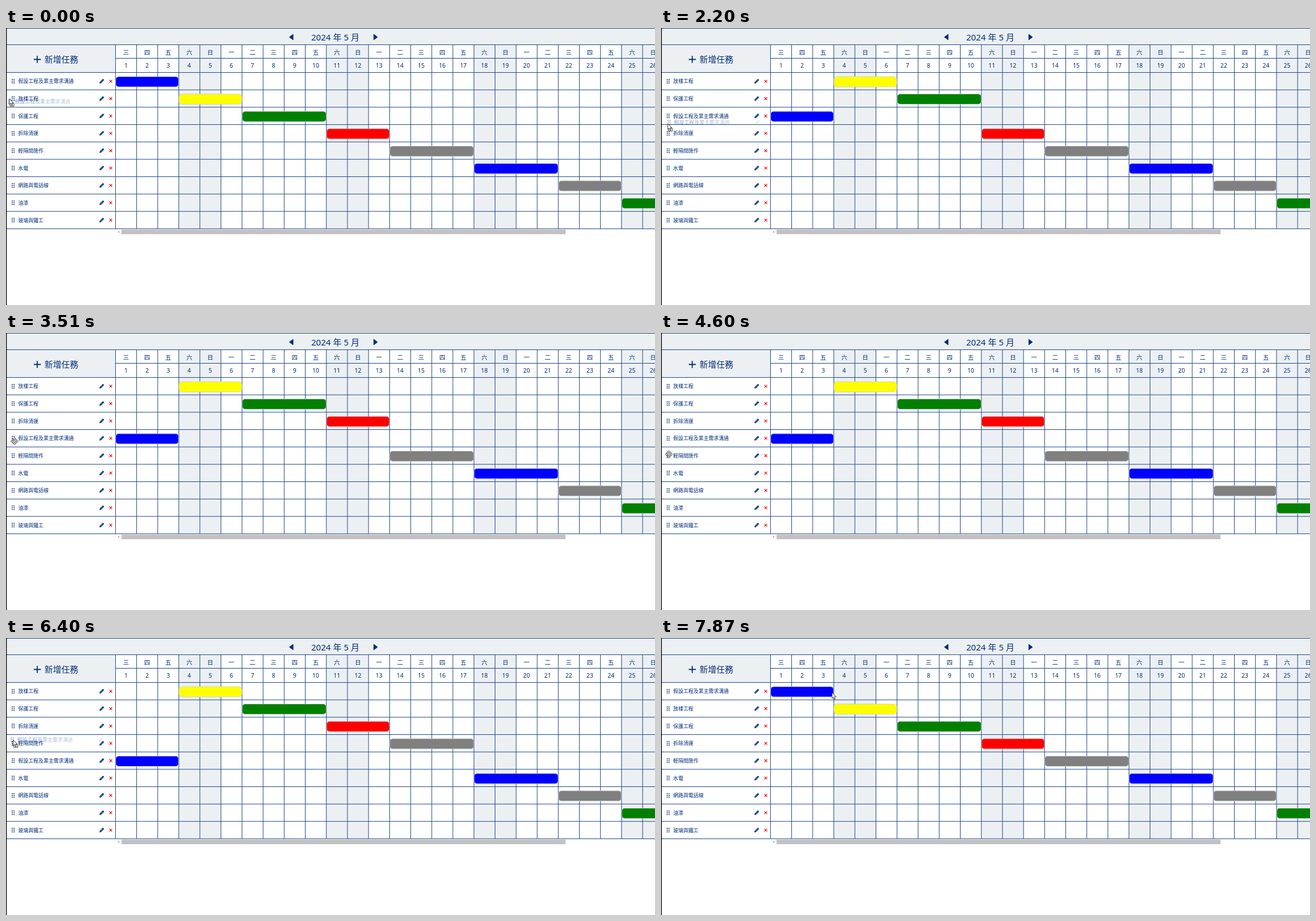
An HTML page with a canvas that plays this animation: 1146 px wide and 489 px high, repeating every 7.99 s.

```html
<!DOCTYPE html>
<html lang="zh-Hant">
<head>
<meta charset="utf-8">
<title>Gantt drag and drop</title>
<style>
html, body { margin: 0; width: 100%; height: 100%; overflow: hidden; background: #fff; }
canvas { display: block; }
</style>
</head>
<body>
<canvas id="stage" width="1146" height="489"></canvas>
<script>
const ctx = document.getElementById('stage').getContext('2d');
const LOOP = 7990, LEFT = 192.9, COL = 37.23, TOP = 78.05, ROW = 30.65;
const INK = '#002c77', LINE = '#1c4587', SHADE = '#ecf0f3';
const FONT = '"Noto Sans", "Noto Sans CJK TC", "Noto Sans CJK", sans-serif';
ctx.lineJoin = 'round';

// name, colour, first day, length in days
const tasks = [
  ['假設工程及業主需求溝通', '#00f', 1, 3],
  ['放樣工程', '#ff0', 4, 3],
  ['保護工程', '#008000', 7, 4],
  ['拆除清運', '#f00', 11, 3],
  ['輕隔間施作', '#808080', 14, 4],
  ['水電', '#00f', 18, 4],
  ['網路與電話線', '#808080', 22, 3],
  ['油漆', '#008000', 25, 4],
  ['玻璃與鐵工']
];

// Pointer moves: each runs in equal steps, then holds its last pose.
// slot is the row of the first task; grab is where the drag began.
const moves = [
  { at: 0, from: [6, 125], kind: 'drag', slot: 0, grab: [12, 89] },
  { at: 150, from: [9, 128], kind: 'move', slot: 1 },
  { at: 580, end: 1260, steps: 6, from: [9.1, 138], to: [10.6, 153], kind: 'drag', slot: 1, grab: [8.5, 127] },
  { at: 1390, from: [10.6, 159], kind: 'move', slot: 2 },
  { at: 2200, end: 3000, steps: 6, from: [12, 169], to: [14, 198], kind: 'drag', slot: 2, grab: [10.5, 158] },
  { at: 3150, from: [15, 204], kind: 'move', slot: 3 },
  { at: 3270, end: 3510, steps: 3, from: [15, 200], to: [15, 191], kind: 'move', slot: 3 },
  { at: 3780, end: 4070, steps: 3, from: [13, 197], to: [9, 219], kind: 'drag', slot: 3, grab: [15, 191] },
  { at: 4200, from: [14, 227], kind: 'move', slot: 3 },
  { at: 4480, end: 4780, steps: 3, from: [14, 214], to: [14, 182], kind: 'move', slot: 3 },
  { at: 4930, end: 5370, steps: 4, from: [13, 190], to: [14, 214], kind: 'drag', slot: 3, grab: [14, 184] },
  { at: 5520, from: [15, 216], kind: 'move', slot: 4 },
  { at: 5830, end: 5950, steps: 2, from: [13.5, 216.5], to: [14.5, 217], kind: 'move', slot: 4 },
  { at: 6250, end: 6780, steps: 5, from: [14, 205], to: [9, 105], kind: 'drag', slot: 4, grab: [14.5, 217] },
  { at: 6910, from: [8, 86], kind: 'move', slot: 4, grab: [14.5, 217] },
  { at: 7060, from: [9, 88], kind: 'move', slot: 0 },
  { at: 7210, from: [34, 112], kind: 'arrow', slot: 0 },
  { at: 7360, end: 7620, steps: 3, from: [140, 112], to: [333, 107], kind: 'arrow', slot: 0 },
  { at: 7750, end: 7870, steps: 2, from: [318, 101], to: [302, 96.5], kind: 'arrow', slot: 0 }
];

function box(x, y, w, h, color) {
  ctx.fillStyle = color;
  ctx.fillRect(x, y, w, h);
}

function text(value, x, y, size, align = 'center', color = INK) {
  ctx.font = `${size}px ${FONT}`;
  ctx.textAlign = align;
  ctx.textBaseline = 'alphabetic';
  ctx.fillStyle = color;
  ctx.fillText(value, x, y + size * 0.37);
}

function polygon(points, fill, stroke) {
  ctx.beginPath();
  points.forEach(([x, y]) => ctx.lineTo(x, y));
  ctx.closePath();
  ctx.fillStyle = fill;
  ctx.fill();
  if (stroke) { ctx.strokeStyle = stroke; ctx.lineWidth = 0.9; ctx.stroke(); }
}

function strokes(color, width, ...lines) {
  ctx.strokeStyle = color;
  ctx.lineWidth = width;
  ctx.beginPath();
  for (const [x1, y1, x2, y2] of lines) { ctx.moveTo(x1, y1); ctx.lineTo(x2, y2); }
  ctx.stroke();
}

function label(name, y, color = INK) {
  for (let i = 0; i < 6; i++) box(10.2 + (i % 2) * 3.2, y - 4 + (i >> 1) * 3.1, 1.7, 1.7, color);
  text(name, 21.6, y, 8.94, 'left', color);
  polygon([[165, 98], [165.6, 95.2], [170.4, 90.4], [171.6, 90], [173, 91.4], [172.6, 92.6], [167.8, 97.4]]
    .map(([px, py]) => [px, py + y - 94]), color);
  strokes('rgba(255,255,255,.7)', 0.7, [167, y + 1.9, 171, y - 2.1]);
}

function drawGrid() {
  box(0, 0, 1146, 489, '#fff');
  box(0, 0, 1146, 29, SHADE);
  box(0, 29, LEFT, 50, SHADE);
  for (let day = 1; day <= 26; day++) {
    const x = LEFT + COL * (day - 1);
    if (day % 7 === 4 || day % 7 === 5) box(x, 29, COL, 326, SHADE);
  }
  for (let day = 1; day <= 26; day++) {
    const x = LEFT + COL * (day - 1), mid = x + 0.4 + COL / 2;
    box(x, 29, 1, 326, LINE);
    text('日一二三四五六'[(day + 2) % 7], mid, 43.5, 10.43);
    text(day, mid, 66, 10.43);
  }
  box(0, 0, 1146, 1, LINE);
  box(0, 29, 1146, 1, LINE);
  box(LEFT, 53, 953, 1, LINE);
  for (let i = 0; i <= 9; i++) box(0, TOP + ROW * i, 1146, 1, LINE);

  text('2024 年 5 月', 581.5, 16, 15.1);
  polygon([[500.4, 16], [507, 11], [507, 21]], INK, INK);
  polygon([[656, 16], [649.4, 11], [649.4, 21]], INK, INK);
  strokes(INK, 1.8, [49, 55.5, 61.5, 55.5], [55.2, 49.3, 55.2, 61.7]);
  text('新增任務', 68, 55.5, 14.9, 'left');

  polygon([[197.5, 360], [200, 357.8], [200, 362.2]], '#a3a3a3');
  box(204, 356, 784, 8, '#c1c1c1');
}

function drawTask([name, color, day, days], row) {
  const y = 94 + ROW * row;
  label(name, y);
  strokes('#f00', 1.2, [182.6, y - 2.4, 187.4, y + 2.4], [187.4, y - 2.4, 182.6, y + 2.4]);
  if (!days) return;
  ctx.beginPath();
  ctx.roundRect(LEFT + COL * (day - 1) + 0.9, y - 8.1, COL * days - 0.8, 18, 5);
  ctx.fillStyle = color;
  ctx.fill();
  ctx.strokeStyle = '#ccc';
  ctx.lineWidth = 0.75;
  ctx.stroke();
}

function drawGhost(slot, dx, dy) {
  const fade = ctx.createLinearGradient(0, 0, 185, 0);
  fade.addColorStop(0, 'rgba(0,44,119,.55)');
  fade.addColorStop(1, 'rgba(0,44,119,.06)');
  ctx.save();
  ctx.translate(dx, dy);
  label(tasks[0][0], 94 + ROW * slot, fade);
  ctx.restore();
}

function drawPointer(kind, x, y) {
  ctx.save();
  ctx.translate(x, y);
  if (kind === 'move') {
    strokes('#333', 2.4, [-4, 0, 4, 0], [0, -4, 0, 4]);
    for (let i = 0; i < 4; i++) {
      polygon([[0, -6.6], [2.8, -3.6], [-2.8, -3.6]], '#fff', '#333');
      ctx.rotate(Math.PI / 2);
    }
    strokes('#fff', 1, [-4, 0, 4, 0], [0, -4, 0, 4]);
  } else {
    if (kind === 'drag') polygon([[1, 8], [8, 8], [8, 13], [1, 13]], '#fff', '#222');
    polygon([[0, 0], [0, 10], [2.3, 8], [4, 11.8], [5.6, 11.1], [4, 7.4], [7.2, 7.2]], '#fff', '#222');
  }
  ctx.restore();
}

function draw(time) {
  const move = moves.findLast(m => m.at <= time);
  const { at, end, steps, from, to, kind, slot, grab } = move;
  const last = steps - 1;
  const k = to ? Math.min(1, Math.floor((time - at) / (end - at) * last + 1e-6) / last) : 0;
  const [x, y] = from.map((v, i) => to ? v + (to[i] - v) * k : v);

  drawGrid();
  tasks.forEach((task, i) => drawTask(task, i === 0 ? slot : i <= slot ? i - 1 : i));
  if (grab) drawGhost(slot, x - grab[0], y - grab[1]);
  box(0, 0, 1.3, 489, '#000');
  drawPointer(kind, x, y);
}

function frame() {
  draw(performance.now() % LOOP);
  requestAnimationFrame(frame);
}
frame();
</script>
</body>
</html>
```
